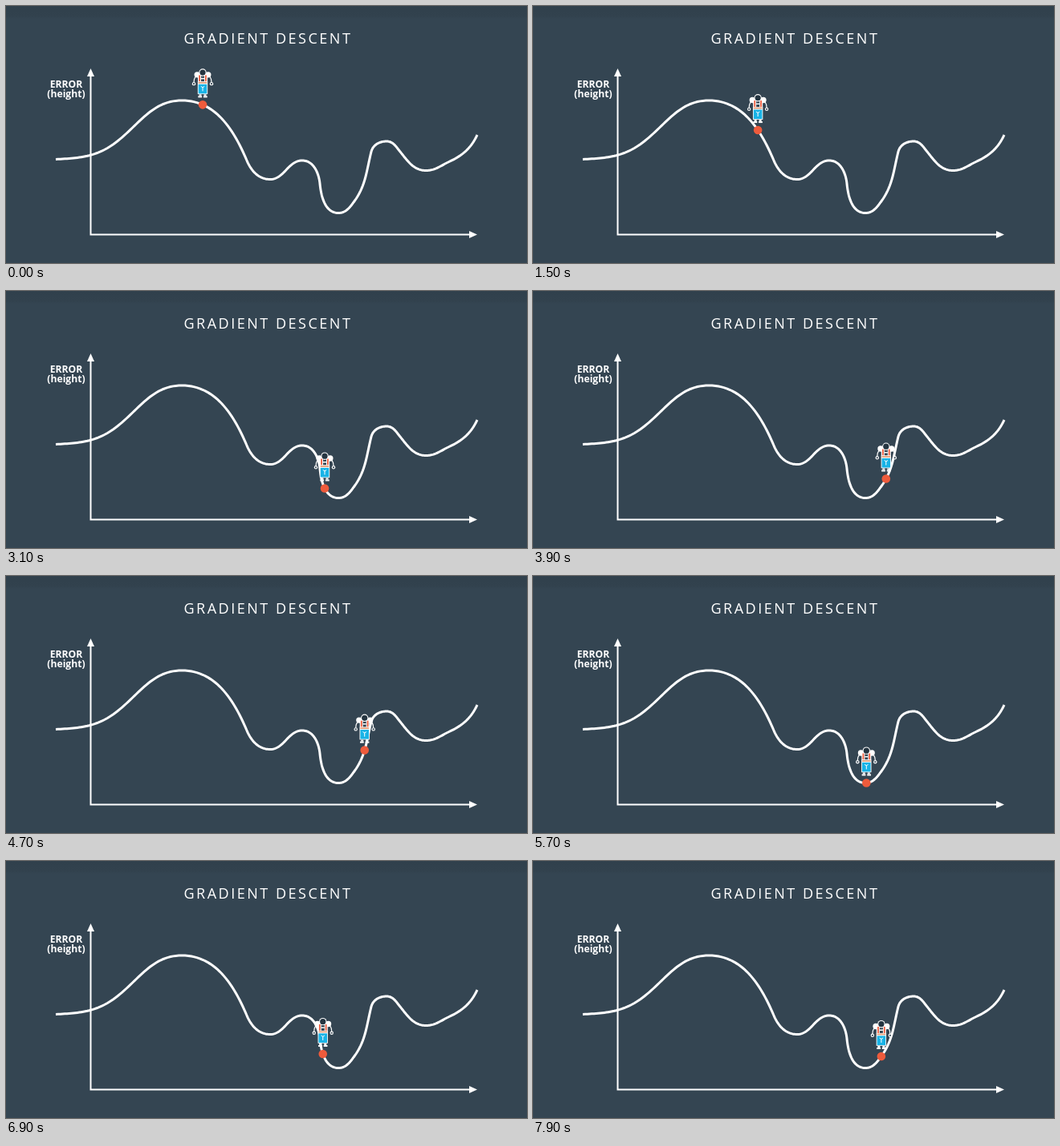
Write an HTML page with a canvas that moves like this. It is 649 px wide and 321 px high and loops after 8000 ms.

```html
<!DOCTYPE html>
<html lang="en">
<head>
<meta charset="utf-8">
<title>Gradient Descent</title>
<style>
  html, body { margin: 0; width: 100%; height: 100%; overflow: hidden; background: #344552; }
  canvas { display: block; width: 649px; height: 321px; }
</style>
</head>
<body>
<canvas id="stage" width="649" height="321"></canvas>
<script>
const ctx = document.getElementById('stage').getContext('2d');
const LOOP = 8000, STEP = 200, START = 500;
const WHITE = '#fff', BG = '#344552', RED = '#ee5b3c', BLUE = '#18b3e6';

// Error curve: x, y and direction in degrees at its peaks, dips and bends
const knots = [
  [62, 191.5, -3], [136, 171, -37], [219, 118, 0], [300, 193, 67],
  [329, 216.5, 0], [369, 193, 0], [391, 222, 84.5], [414, 258.5, 0],
  [433.5, 244.5, -54], [455, 182, -76], [474, 169, 0], [491, 182, 51],
  [523, 205.5, 0], [552, 194.5, -25], [587, 161, -65]
];
const TENSION = 0.38;

const easeInOut = u => (1 - Math.cos(Math.PI * u)) / 2;
const easeOut = u => Math.sin(Math.PI * u / 2);

// The roll: each leg carries the ball to its next x; the last is cut by the loop
const startX = 245;
const legs = [
  { from: 300, to: 900, x: 276.5, ease: easeInOut },
  { from: 1300, to: 3100, x: 397, ease: easeInOut },
  { from: 3100, to: 4400, x: 449, ease: easeOut },
  { from: 4400, to: 6700, x: 393, ease: easeInOut },
  { from: 6700, to: 8400, x: 444, ease: easeInOut }
];

const bez = (a, b, c, d, u) => {
  const v = 1 - u;
  return v * v * v * a + 3 * v * v * u * b + 3 * v * u * u * c + u * u * u * d;
};

function sampleCurve(count) {
  const out = [knots[0].slice(0, 2)];
  for (let k = 1; k < knots.length; k++) {
    const [x0, y0, d0] = knots[k - 1], [x1, y1, d1] = knots[k];
    const reach = TENSION * Math.hypot(x1 - x0, y1 - y0);
    const a0 = d0 * Math.PI / 180, a1 = d1 * Math.PI / 180;
    for (let i = 1; i <= count; i++) {
      const u = i / count;
      out.push([
        bez(x0, x0 + reach * Math.cos(a0), x1 - reach * Math.cos(a1), x1, u),
        bez(y0, y0 + reach * Math.sin(a0), y1 - reach * Math.sin(a1), y1, u)
      ]);
    }
  }
  return out;
}
const curve = sampleCurve(30);

function curveY(x) {
  const i = Math.max(1, curve.findIndex(p => p[0] >= x));
  const [a, b] = [curve[i - 1], curve[i]];
  return a[1] + (b[1] - a[1]) * (x - a[0]) / (b[0] - a[0]);
}

function ballX(t) {
  let x = startX;
  for (const leg of legs) {
    const u = Math.min(1, Math.max(0, (t - leg.from) / (leg.to - leg.from)));
    x += (leg.x - x) * leg.ease(u);
  }
  return x;
}

function rect(x, y, w, h, color) {
  ctx.fillStyle = color;
  ctx.fillRect(x, y, w, h);
}

function disc(x, y, r, color) {
  ctx.fillStyle = color;
  ctx.beginPath();
  ctx.arc(x, y, r, 0, Math.PI * 2);
  ctx.fill();
}

function line(points, width) {
  ctx.strokeStyle = WHITE;
  ctx.lineWidth = width;
  ctx.beginPath();
  points.forEach(p => ctx.lineTo(...p));
  ctx.stroke();
}

function arrowHead(x, y, angle) {
  ctx.save();
  ctx.translate(x, y);
  ctx.rotate(angle);
  ctx.fillStyle = WHITE;
  ctx.beginPath();
  ctx.moveTo(0, 0);
  ctx.lineTo(-10, -4.5);
  ctx.lineTo(-10, 4.5);
  ctx.fill();
  ctx.restore();
}

function label(text, x, y, font, spacing, align) {
  ctx.font = font + ' "Open Sans", sans-serif';
  ctx.letterSpacing = spacing + 'px';
  ctx.textAlign = align;
  ctx.fillStyle = WHITE;
  ctx.fillText(text, x, y);
}

function backdrop() {
  rect(0, 0, 649, 321, BG);
  const shade = ctx.createLinearGradient(0, 0, 0, 16);
  shade.addColorStop(0, '#30404c');
  shade.addColorStop(0.8, '#32424e');
  shade.addColorStop(1, BG);
  rect(0, 0, 649, 16, shade);
}

function chart() {
  label('GRADIENT DESCENT', 221.5, 46.5, '18px', 2.5, 'left');
  label('ERROR', 75, 102, 'bold 12.2px', 0, 'center');
  label('(height)', 75, 113.5, 'bold 12.2px', 0, 'center');
  line([[105.5, 86], [105.5, 285.5], [579, 285.5]], 2);
  arrowHead(105.5, 78, -Math.PI / 2);
  arrowHead(587, 285.5, 0);
  line(curve, 3);
}

function robot(x, y) {
  ctx.save();
  ctx.translate(x, y);
  disc(0, 0, 5.3, RED);

  // Arms, shoulders and feet, mirrored
  for (const s of [-1, 1]) {
    line([[s * 8.5, -36], [s * 10.5, -32], [s * 11, -28]], 1.2);
    disc(s * 11, -26.2, 2.2, WHITE);
    disc(s * 11, -26.2, 1.1, BG);
    disc(s * 6.8, -37.5, 3.7, WHITE);
    rect(s * 3 - 1.5, -13, 3, 2, WHITE);
    rect(s * 3.3 - 2.4, -11, 4.8, 2, WHITE);
  }

  // Torso and head
  rect(-6, -38.5, 12, 10, WHITE);
  rect(-2, -37, 4, 8, BG);
  for (const s of [-1, 1]) rect(s * 3.9 - 0.9, -37, 1.8, 8, RED);
  rect(-2, -33.5, 4, 1.5, WHITE);
  disc(0, -40.3, 4.7, WHITE);
  disc(0, -40.3, 3.6, '#253541');

  // Belt and legs
  rect(-6.2, -29, 12.4, 15.8, WHITE);
  rect(-5.3, -28.4, 10.6, 1.8, '#e5a07c');
  rect(-5.3, -25.6, 10.6, 11.6, BLUE);
  line([[-2.2, -23], [0, -21.6], [2.2, -23]], 1);
  line([[0, -22], [0, -17]], 1);
  ctx.restore();
}

function draw(now) {
  const t = now % LOOP;
  const held = t < START ? 0 : START + Math.floor((t - START) / STEP) * STEP;
  const x = ballX(held);
  backdrop();
  chart();
  robot(x, curveY(x));
  requestAnimationFrame(draw);
}

requestAnimationFrame(draw);
</script>
</body>
</html>
```
